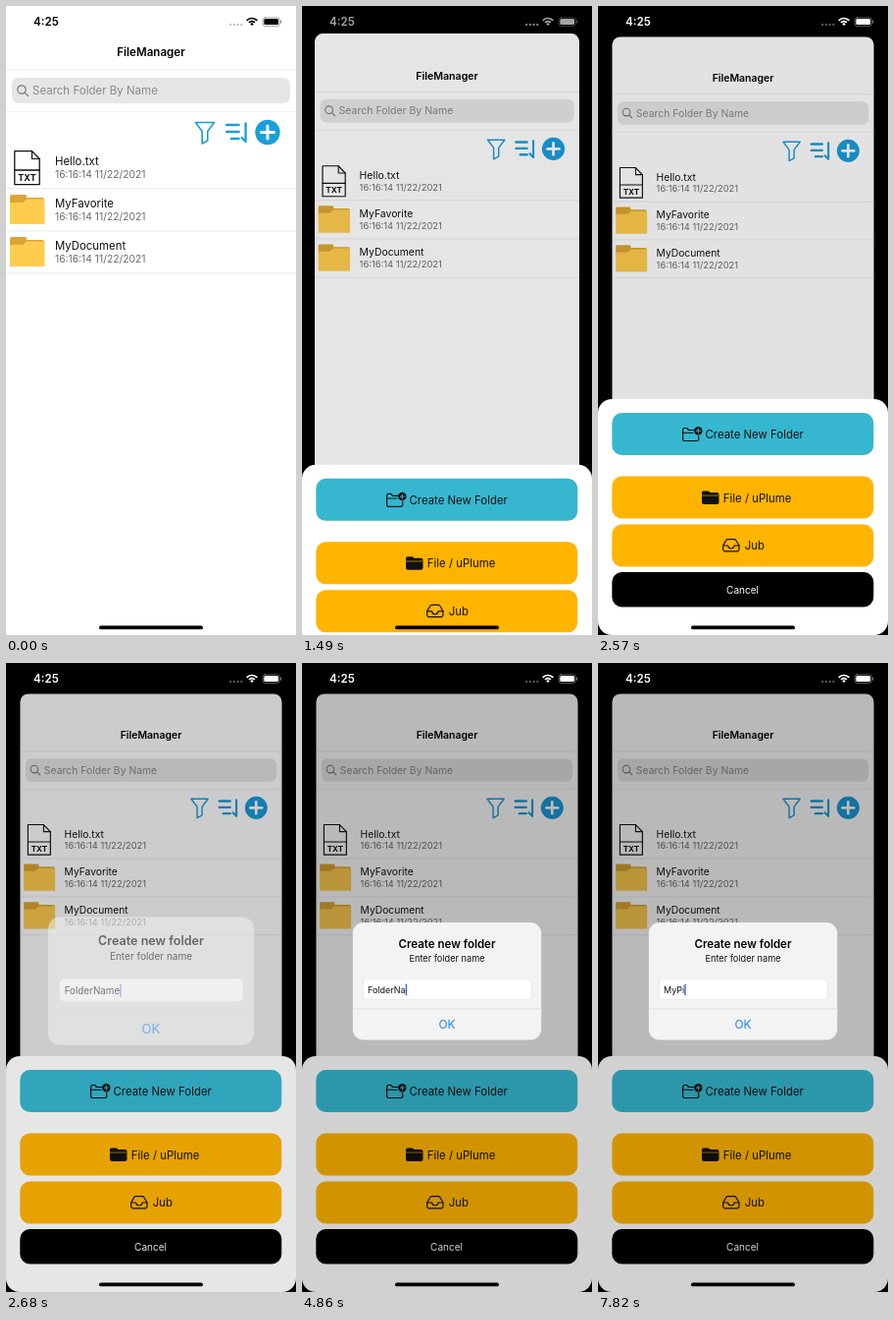
An HTML page with a canvas that plays this animation: 296 by 640 pixels, repeating every 7.99 s.

```html
<!DOCTYPE html>
<html lang="en">
<head>
<meta charset="utf-8">
<title>File manager</title>
<style>
html, body { margin: 0; width: 100%; height: 100%; overflow: hidden; background: #000; }
canvas { display: block; width: 296px; height: 640px; }
</style>
</head>
<body>
<canvas id="stage"></canvas>
<script>
const W = 296, H = 640, LOOP = 7990;
const canvas = document.getElementById('stage');
const ratio = window.devicePixelRatio || 1;
canvas.width = W * ratio;
canvas.height = H * ratio;
const c = canvas.getContext('2d');

const BLUE = '#1a9ddb', TEAL = '#36b7cf', AMBER = '#ffb400';
const SHEET_STEPS = [1370, 1490, 1590, 1690];
const ALERT_STEPS = [2680, 2790, 2910, 3010];
const FIELD = [
  [0, 'FolderName'], [4450, 'FolderNam'], [4860, 'FolderNa'], [4970, 'FolderN'],
  [5080, 'Folder'], [5180, 'Folde'], [5290, 'Fold'], [5400, 'Fol'], [5500, 'Fo'],
  [5610, 'F'], [5720, ''], [6440, 'M'], [6810, 'My'], [7430, 'MyP'], [7820, 'MyPi']
];
const CARET = [[0, 0.7], [2910, 1], [3150, 0.5], [3290, 0], [3610, 1], [4150, 0.5], [4270, 0], [4450, 1]];

const mix = (a, b, p) => a + (b - a) * p;

// Latest entry of a [time, value] list
function at(list, t) {
  let value = list[0][1];
  for (const [time, v] of list) if (t >= time) value = v;
  return value;
}

// Critically damped spring, shown only at the given steps
function spring(t, start, steps) {
  const shown = steps.filter(s => s <= t).pop();
  if (shown === undefined) return 0;
  if (shown === steps[steps.length - 1]) return 1;
  const x = 18.26 * (shown - start) / 1000;
  return 1 - (1 + x) * Math.exp(-x);
}

function text(str, x, y, size, color, weight = 400, align = 'left') {
  c.font = `${weight} ${size}px Inter, "Open Sans", sans-serif`;
  c.textAlign = align;
  c.fillStyle = color;
  c.fillText(str, x, y);
}

function panel(x, y, w, h, r, color) {
  c.beginPath();
  c.roundRect(x, y, w, h, r);
  c.fillStyle = color;
  c.fill();
}

function line(points, color, width, close) {
  c.beginPath();
  points.forEach(([x, y]) => c.lineTo(x, y));
  if (close) c.closePath();
  c.strokeStyle = color;
  c.lineWidth = width;
  c.stroke();
}

function disc(x, y, r, color) {
  c.beginPath();
  c.arc(x, y, r, 0, 7);
  c.fillStyle = color;
  c.fill();
}

function rule(y, color = '#e4e4e4') {
  c.fillStyle = color;
  c.fillRect(0, y, W, 0.8);
}

function statusBar(level) {
  const v = Math.round(255 * level), color = `rgb(${v},${v},${v})`;
  text('4:25', 28, 20, 11.6, color, 600);
  const dot = Math.round(mix(195, 85, level));
  for (let i = 0; i < 4; i++) disc(229.2 + i * 3.7, 19, 1.2, `rgb(${dot},${dot},${dot})`);
  c.strokeStyle = color;
  c.lineWidth = 1.7;
  c.lineCap = 'butt';
  for (const r of [3.9, 7]) {
    c.beginPath();
    c.arc(251, 19.5, r, -Math.PI * 0.77, -Math.PI * 0.23);
    c.stroke();
  }
  c.beginPath();
  c.moveTo(251, 20);
  c.arc(251, 19.8, 2.4, -Math.PI * 0.77, -Math.PI * 0.23);
  c.fillStyle = color;
  c.fill();
  c.lineCap = 'round';
  c.globalAlpha = 0.45;
  c.lineWidth = 0.8;
  c.beginPath();
  c.roundRect(262, 11.8, 17.4, 8.6, 2.6);
  c.stroke();
  panel(280.1, 14.6, 1.2, 3, 0.6, color);
  c.globalAlpha = 1;
  panel(263.3, 13.1, 14.8, 6, 1.5, color);
}

function folder(y) {
  panel(4, y, 17, 12, 1.5, '#dba632');
  panel(5, y + 3, 34, 20, 1.5, '#dba632');
  c.beginPath();
  c.moveTo(4, y + 8);
  c.lineTo(17, y + 8);
  c.lineTo(21, y + 4.5);
  c.lineTo(39.5, y + 4.5);
  c.lineTo(39.5, y + 30);
  c.lineTo(4, y + 30);
  c.fillStyle = '#ffcc4e';
  c.fill();
}

function textFile() {
  line([[8.8, 167], [8.8, 147.6], [26.5, 147.6], [34.2, 155.5], [34.2, 167]], '#111', 1.3);
  line([[26.5, 147.6], [26.5, 155.5], [34.2, 155.5]], '#111', 1.2);
  line([[8.8, 167], [34.2, 167], [34.2, 181.6], [8.8, 181.6]], '#111', 1.3, true);
  text('TXT', 21.5, 178, 9, '#111', 700, 'center');
}

function row(name, y) {
  text(name, 50, y + 18.5, 11.4, '#111');
  text('16:16:14 11/22/2021', 50, y + 31.5, 10.3, '#6b6b6b');
  rule(y + 42);
}

function tools() {
  line([[193.5, 118.5], [212.5, 118.5], [205.8, 127.5], [205.8, 137], [200.2, 140], [200.2, 127.5]], BLUE, 1.6, true);
  for (const [x, y] of [[225.3, 121], [225.3, 128], [230, 135]]) line([[x, y], [237.5, y]], BLUE, 2.6);
  line([[240.6, 134], [244.6, 138], [244.6, 119.5]], BLUE, 2.3);
  disc(267, 128.5, 12.7, BLUE);
  line([[260.5, 128.5], [273.5, 128.5]], '#fff', 3);
  line([[267, 122], [267, 135]], '#fff', 3);
}

function page() {
  text('FileManager', 148, 51, 11.6, '#000', 600, 'center');
  rule(64.5);
  panel(6, 73, 284, 26, 7, '#e6e6e7');
  c.beginPath();
  c.arc(16, 85, 4.2, 0, 7);
  c.strokeStyle = '#78787c';
  c.lineWidth = 1.2;
  c.stroke();
  line([[19.1, 88.1], [22.5, 91.5]], '#78787c', 1.2);
  text('Search Folder By Name', 27, 90, 11.5, '#88888c');
  rule(107, '#ececec');
  tools();
  textFile();
  folder(192);
  folder(235);
  row('Hello.txt', 143.5);
  row('MyFavorite', 186.5);
  row('MyDocument', 229.5);
}

function card(p) {
  const s = mix(1, 0.902, p);
  c.save();
  c.translate(148 * (1 - s), 31.4 * p);
  c.scale(s, s);
  c.beginPath();
  c.roundRect(0, 0, W, H, p ? 9 : 0);
  c.fillStyle = '#fff';
  c.fill();
  c.clip();
  page();
  c.fillStyle = `rgba(0,0,0,${0.114 * p})`;
  c.fillRect(0, 0, W, H);
  c.restore();
}

function newFolderIcon() {
  line([[98, 431.5], [92.5, 431.5], [90.8, 429.5], [87.8, 429.5], [86.6, 430.7], [86.6, 441.3],
    [87.8, 442.5], [101.5, 442.5], [102.7, 441.3], [102.7, 437.5]], '#111', 1.2);
  line([[86.6, 434.2], [97, 434.2]], '#111', 1.1);
  disc(102.3, 432.2, 4.2, '#111');
  line([[100, 432.2], [104.6, 432.2]], TEAL, 1);
  line([[102.3, 429.9], [102.3, 434.5]], TEAL, 1);
}

function solidFolderIcon() {
  panel(106, 493.5, 8, 5, 1.5, '#111');
  panel(106, 495, 17.5, 4, [1, 2, 0, 0], '#111');
  panel(106, 498.5, 17.5, 8.5, [0, 0, 2, 2], '#111');
  line([[106.5, 498.1], [123, 498.1]], AMBER, 0.6);
}

function trayIcon() {
  line([[127.7, 549], [131, 543.2], [132.2, 542.6], [139.4, 542.6], [140.6, 543.2], [144, 549],
    [144, 553.3], [142.6, 554.8], [129.1, 554.8], [127.7, 553.3]], '#111', 1.2, true);
  c.beginPath();
  c.moveTo(127.7, 549);
  c.lineTo(132.6, 549);
  c.bezierCurveTo(133, 553, 138.7, 553, 139.1, 549);
  c.lineTo(144, 549);
  c.stroke();
}

function sheet(p) {
  c.save();
  c.translate(0, H * (1 - p));
  panel(0, 400, W, 240, 14, '#fff');
  panel(14.3, 414, 267, 43, 10, TEAL);
  panel(14.3, 478.5, 267, 43, 10, AMBER);
  panel(14.3, 527.5, 267, 43, 10, AMBER);
  panel(14.3, 576, 267, 35.5, 10, '#000');
  newFolderIcon();
  solidFolderIcon();
  trayIcon();
  text('Create New Folder', 109.5, 440, 11.4, '#111');
  text('File / uPlume', 127.8, 504.5, 11.4, '#111');
  text('Jub', 149.8, 553.3, 11.4, '#111');
  text('Cancel', 147.5, 597.5, 10, '#fff', 400, 'center');
  c.restore();
}

function dialog(p, t) {
  c.fillStyle = `rgba(0,0,0,${0.18 * p})`;
  c.fillRect(0, 0, W, H);
  c.save();
  c.globalAlpha = p;
  const s = mix(1.2, 1, p);
  c.translate(148, 323.7);
  c.scale(s, s);
  c.translate(-148, -323.7);
  panel(51.8, 264, 192.4, 119.4, 11, '#f3f3f3');
  text('Create new folder', 148, 290, 11.5, '#000', 600, 'center');
  text('Enter folder name', 148, 304, 9.2, '#111', 400, 'center');
  panel(62, 321, 172.5, 22, 5, '#dcdcdc');
  panel(62.5, 321.5, 171.5, 21, 4.5, '#fff');
  const value = at(FIELD, t);
  text(value, 67, 335.7, 9, '#111');
  const end = 67 + c.measureText(value).width;
  c.globalAlpha = p * at(CARET, t);
  panel(end, 326.5, 1.5, 12, 0.7, '#3a6cf0');
  c.globalAlpha = p;
  c.fillStyle = '#dadada';
  c.fillRect(51.8, 351.5, 192.4, 0.8);
  text('OK', 148, 372.3, 12, '#1a82f7', 400, 'center');
  c.restore();
}

function draw(t) {
  const open = spring(t, 1280, SHEET_STEPS);
  const alert = spring(t, 2580, ALERT_STEPS);
  c.setTransform(ratio, 0, 0, ratio, 0, 0);
  c.lineCap = c.lineJoin = 'round';
  c.fillStyle = '#000';
  c.fillRect(0, 0, W, H);
  card(open);
  if (open) sheet(open);
  if (alert) dialog(alert, t);
  statusBar(open ** 4);
  panel(95, 630.5, 106, 3.8, 1.9, '#000');
}

function tick(now) {
  draw(now % LOOP);
  requestAnimationFrame(tick);
}
requestAnimationFrame(tick);
</script>
</body>
</html>
```
